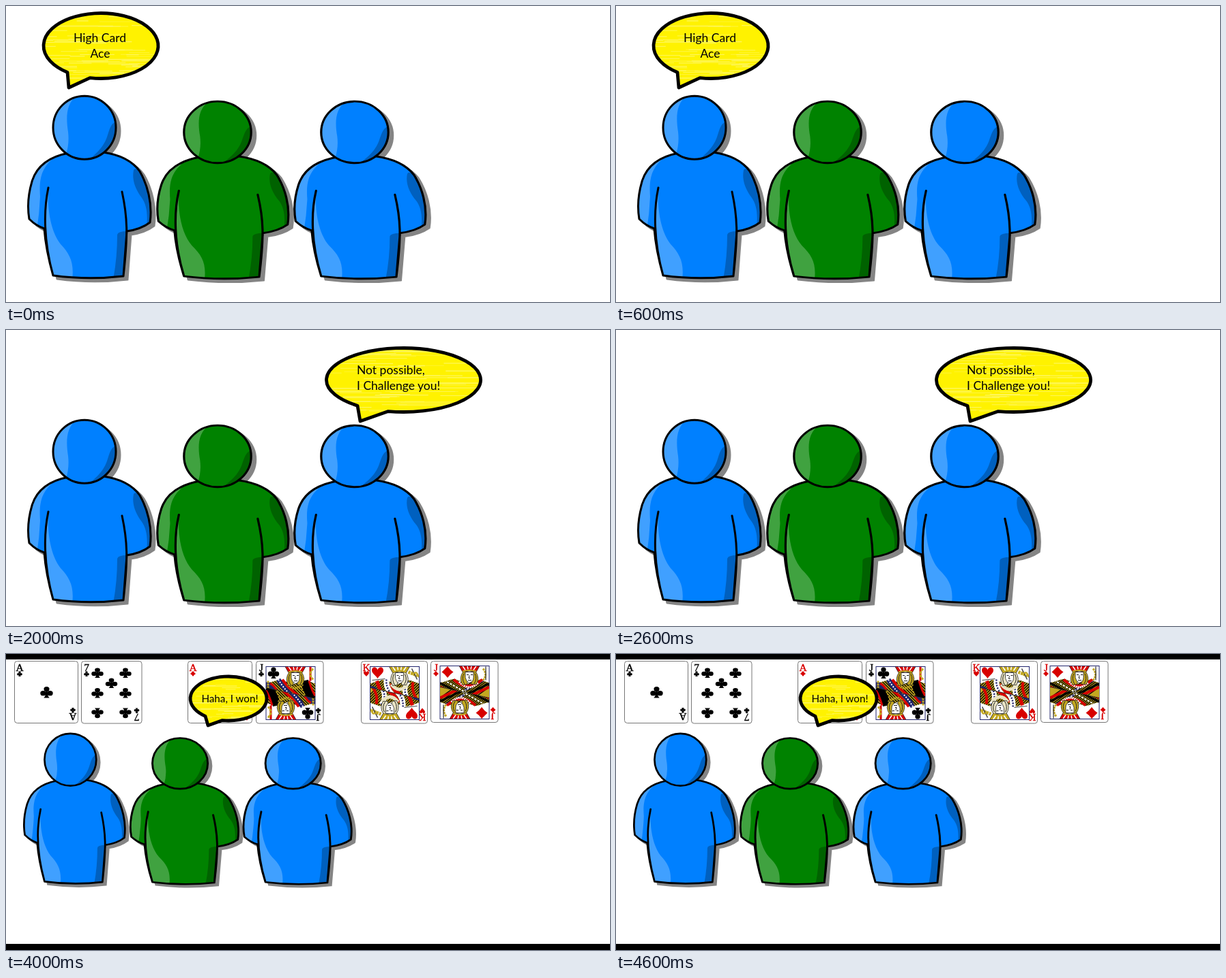
An HTML page that plays this animation: 885 by 435 pixels, repeating every 5 s.

```html
<!DOCTYPE html>
<html lang="en">
<head>
<meta charset="utf-8">
<title>Card bluff</title>
<style>
  html, body { margin: 0; width: 100%; height: 100%; overflow: hidden; background: #fff; }
  svg { display: block; width: 885px; height: 435px; }
  .say { font-family: Lato, "Open Sans", sans-serif; fill: #000; }
  .rank { font: 15.5px "Liberation Serif", "Noto Serif", serif; text-anchor: middle; stroke-width: .4px; }
</style>
</head>
<body>
<svg id="stage" viewBox="0 0 885 435"></svg>
<script>
const RED = '#d80000', NAVY = '#20246c', GOLD = '#c3a820', BLACK = '#000', WHITE = '#fff';
const STEP = 1000, STEPS = 5;

let seed = 7;
const rnd = () => (seed = (seed * 16807) % 2147483647) / 2147483647;
const shape = (d, attrs = '') => `<path d="${d}" ${attrs}/>`;
const group = (attrs, inner) => `<g ${attrs}>${inner}</g>`;
const line = ([d, color, width, dash = 'none']) =>
  shape(d, `fill="none" stroke="${color}" stroke-width="${width}" stroke-dasharray="${dash}"`);

// People
const BODY = 'M92 216C60 222 44 238 38 258C33 275 31 295 34 313Q44 323 56 327C58 355 63 375 69 396' +
  'Q120 403 172 397L177 331Q198 328 211 318C215 290 207 262 196 243C184 226 163 218 143 215Z';
const SEAMS = 'M62 267C55 300 55 345 69 396M170 273C178 310 179 335 172 397';
const BODY_LIGHT = 'M76 218C52 236 48 252 50 280Q49 305 45 330L20 320V215Z' +
  'M62 267C60 300 66 332 80 350C94 365 100 377 97 403L69 400C60 370 56 340 57 310Z';
const BODY_DARK = 'M187 241C184 256 190 270 199 282C206 292 208 306 206 326L220 325V270L201 246Q190 236 187 241Z' +
  'M163 336Q164 331 178 331L172 402H157Q163 370 163 336Z';
const HEAD_LIGHT = 'M106 130C87 142 88 165 91 185Q93 202 88 218L60 215V130Z';
const HEAD_DARK = 'M165 168C149 172 152 190 143 203C137 213 130 218 120 228H165Z';
const head = (attrs = '') => `<ellipse cx="115" cy="178.700" rx="46" ry="46.500" ${attrs}/>`;

function person(color) {
  const shade = (d, tone) => shape(d, `fill="${tone}" opacity=".25" stroke="none"`);
  const ink = 'fill="none" stroke="#000"';
  return group('transform="translate(6 5)" fill="#858585" stroke="#858585"', shape(BODY) + head()) +
    group('clip-path="url(#body)"',
      shape(BODY, `fill="${color}"`) + shade(BODY_LIGHT, WHITE) + shade(BODY_DARK, BLACK)) +
    shape(BODY + SEAMS, ink + ' stroke-linecap="round" stroke-linejoin="round"') +
    group('clip-path="url(#head)"',
      head(`fill="${color}"`) + shade(HEAD_LIGHT, WHITE) + shade(HEAD_DARK, BLACK)) +
    head(ink);
}

const wide = x => `transform="matrix(1.070 0 0 .974 ${x - 115 * 1.07} 11.400)"`;
const crowd = person('#0080ff') + group(wide(310), person('#008200')) + group(wide(511), person('#0080ff'));

// Speech bubbles
function bubble({ cx, cy, rx, ry, tip, from, to, size, text, anchor = 'start' }) {
  const low = x => cy + ry * Math.sqrt(1 - ((x - cx) / rx) ** 2);
  const d = `M${from} ${low(from)}A${rx} ${ry} 0 1 1 ${to} ${low(to)}L${tip}Z`;
  let streaks = '';
  for (let i = 0; i < ry * 1.5; i++) {
    const y = cy + (rnd() * 2 - 1) * ry, x = cx + (rnd() * 2 - 1.4) * rx;
    streaks += line([`M${x} ${y}h${rx * (.2 + rnd() * .8)}`, '#fffbb0', .5 + rnd()]);
  }
  const id = 'b' + cx;
  return `<clipPath id="${id}">${shape(d)}</clipPath>` +
    shape(d, 'fill="#fff200"') +
    group(`clip-path="url(#${id})" opacity=".5"`, streaks) +
    shape(d, 'fill="none" stroke="#000" stroke-width="4.800" stroke-linejoin="round"') +
    text.map(([x, y, s]) =>
      `<text class="say" x="${x}" y="${y}" font-size="${size}" text-anchor="${anchor}">${s}</text>`).join('');
}

const bubbles = [
  { cx: 139, cy: 58.5, rx: 84, ry: 48, tip: '92 120', from: 90, to: 123, size: 17.5, anchor: 'middle',
    text: [[137.5, 53, 'High Card'], [138, 76, 'Ace']] },
  { cx: 355, cy: 73, rx: 86, ry: 42, tip: '307 126', from: 304, to: 338, size: 17.5,
    text: [[337, 68, 'Pair'], [337, 91, 'Ace']] },
  { cx: 582.5, cy: 73.5, rx: 113, ry: 47, tip: '519 134', from: 515, to: 560, size: 17.5,
    text: [[514, 65, 'Not possible,'], [514, 88, 'I Challenge you!']] },
  { cx: 326, cy: 65.5, rx: 56, ry: 32.5, tip: '296 105', from: 292, to: 317, size: 15.2, anchor: 'middle',
    text: [[328, 71, 'Haha, I won!']] }
].map(bubble);

// Cards
const dot = (x, y) => `M${x - 4.3} ${y}a4.3 4.3 0 1 1 8.6 0a4.3 4.3 0 1 1 -8.6 0`;
const SUITS = {
  club: [BLACK, dot(0, -5.2) + dot(-5.4, 2) + dot(5.4, 2) + 'M-1.500 -3H1.500Q1 7 4.500 10H-4.500Q-1 7 -1.500 -3Z'],
  diamond: [RED, 'M0 -10Q4 -4 10 0Q4 4 0 10Q-4 4 -10 0Z'],
  heart: [RED, 'M0 10C-4 4 -10 1 -10 -4C-10 -11 -2 -11 0 -5C2 -11 10 -11 10 -4C10 1 4 4 0 10Z']
};
const pip = (suit, x, y, w, h = w, turn = 0) =>
  shape(SUITS[suit][1],
    `fill="${SUITS[suit][0]}" transform="translate(${x} ${y}) rotate(${turn}) scale(${w / 20} ${h / 20})"`);
const twice = (inner, x = 0, y = 0) => inner + group(`transform="rotate(180 ${x} ${y})"`, inner);

function card(x, y, w, h, rank, suit, inner) {
  const ink = SUITS[suit][0];
  const index = `<text class="rank" x="${x + 7.5}" y="${y + 14.5}" fill="${ink}" stroke="${ink}">${rank}</text>` +
    pip(suit, x + 7.5, y + 18.5, 8);
  return `<rect x="${x}" y="${y}" width="${w}" height="${h}" rx="4" fill="#fff" stroke="#777"/>` +
    twice(index, x + w / 2, y + h / 2) + inner;
}

function face(x, hat, hair) {
  return group(`transform="translate(${x} -25)"`,
    shape('M-9 -6Q-16 4 -10 14L-3 13V-6ZM9 -6Q16 4 10 13L3 13V-6Z', `fill="${hair}" stroke="#222" stroke-width=".8"`) +
    line(['M-8 -3Q-12 5 -7 13M8 -3Q12 5 7 12', '#222', 1]) +
    shape('M-6 -5V3Q-5 9 0 11Q6 9 6 3V-5Z', 'fill="#fff" stroke="#222" stroke-width=".8"') +
    line(['M-4 -1h3M2 -1h3M0 0L-1 4H1M-2 7H3', '#222', 1]) +
    shape('M-15 -14H15L10 -5Q0 -8 -10 -5Z', `fill="${hat}" stroke="#222" stroke-width=".8"`) +
    line(['M-10 -6Q0 -9 10 -6', GOLD, 2.2]) +
    line(['M-10 -14L-6 -8M-3 -14L-2 -9M3 -14L2 -9M10 -14L6 -8', WHITE, 1.5]));
}

// Fine diagonal engraving across a robe
function hatch(slope) {
  let d = '';
  for (let x = -60; x < 60; x += 4) d += `M${x} -22l${slope * 32} 32`;
  return line([d, BLACK, 1.3]);
}

function court(x, y, suit, slope, bands, hat, hair) {
  const half = group('clip-path="url(#half)"',
    group('clip-path="url(#robe)"',
      `<rect x="-36" y="-30" width="72" height="40" fill="${GOLD}"/>` + hatch(slope)) +
    bands.map(line).join('') + face(7, hat, hair) + pip(suit, -25, -30, 17));
  return group(`transform="translate(${x} ${y})"`,
    `<rect x="-36" y="-39" width="72" height="78" fill="#fff" stroke="${NAVY}"/>` +
    twice(half) + line(['M-36 -8L36 8', '#222', .8]));
}

const jackOfClubs = court(417, 57.5, 'club', 1, [
  ['M-36 -12Q-24 -14 -20 9', NAVY, 8],
  ['M-30 -14Q-20 -10 -17 9', RED, 3],
  ['M-18 -20Q-10 -6 4 6', NAVY, 7],
  ['M-18 -20Q-10 -6 4 6', WHITE, 2, '2 2'],
  ['M-12 -20Q-4 -8 12 4', RED, 4],
  ['M20 -18Q24 -4 32 9', BLACK, 12],
  ['M14 -14Q18 -2 24 9', GOLD, 2, '2 2'],
  ['M27 -18Q31 -4 36 4', RED, 3],
  ['M-4 -14Q7 0 18 -14', GOLD, 4, '2 1'],
  ['M29 -39V-18', RED, 3],
  ['M33 -36Q25 -28 33 -20', GOLD, 3, '4 1'],
  ['M-33 -18V6', GOLD, 3, '3 1']
], RED, GOLD);

const kingOfHearts = court(569.5, 57.5, 'heart', -1, [
  ['M-36 -8Q-26 -10 -20 8', NAVY, 4],
  ['M-26 -18Q-22 -4 -14 9', RED, 5],
  ['M-12 -20Q-14 -4 4 9', WHITE, 8],
  ['M-12 -20Q-14 -4 4 9', NAVY, 2.5, '2 2'],
  ['M-5 -14Q0 -2 14 8', RED, 6],
  ['M20 -17Q10 -6 20 10', WHITE, 7],
  ['M20 -17Q10 -6 20 10', NAVY, 2.5, '2 2'],
  ['M27 -16Q24 -4 32 8', RED, 4],
  ['M-5 -13Q7 2 19 -13', '#e9e3c2', 5],
  ['M20 -31L36 -25', GOLD, 5, '3 1'],
  ['M25 -36L33 -20', '#444', 1.5],
  ['M26 -27Q32 -35 35 -24', GOLD, 2],
  ['M-33 -19L-14 -21', '#444', 1.2]
], GOLD, '#e9e3c2');

const jackOfDiamonds = court(672, 56.5, 'diamond', -1.4, [
  ['M-36 -14L4 7', BLACK, 3],
  ['M-36 -8L0 10', RED, 4],
  ['M-30 -18L10 5', WHITE, 2, '3 2'],
  ['M36 -13L-4 6', BLACK, 3],
  ['M36 -8L0 9', RED, 4],
  ['M28 -18L0 -3', NAVY, 3],
  ['M28 -18L0 -3', WHITE, 1.5, '3 2'],
  ['M-16 -19Q4 0 26 -19', RED, 4],
  ['M-8 -16Q6 0 20 -15', WHITE, 3, '2 1'],
  ['M27 -35Q34 -26 27 -18', GOLD, 3, '3 1'],
  ['M31 -38V-18', '#333', 1.3]
], RED, GOLD);

const sevenSpots = [134, 175].map(x =>
  pip('club', x, 27.5, 18, 15) + pip('club', x, 57, 18, 15) + pip('club', x, 87, 18, 15, 180)).join('') +
  pip('club', 154.5, 42.5, 18, 15);

const cards =
  card(12.5, 10.5, 93, 91, 'A', 'club', pip('club', 59.5, 56, 19, 17)) +
  card(110.5, 10.5, 88.5, 91.5, '7', 'club', sevenSpots) +
  card(266.5, 10.5, 94, 91, 'A', 'diamond', pip('diamond', 313.5, 56.5, 15)) +
  card(366.5, 10.5, 98.5, 91.5, 'J', 'club', jackOfClubs) +
  card(520.5, 10.5, 97, 91.5, 'K', 'heart', kingOfHearts) +
  card(622.5, 10.5, 98.5, 90, 'J', 'diamond', jackOfDiamonds);

// Scenes: each layer lists the steps in which it shows
const layers = [
  [[0, 1, 2], group('stroke-width="3"', crowd)],
  [[3, 4], '<path d="M0 0H885V8H0ZM0 426H885V435H0Z"/>' + cards +
    group('transform="matrix(.824 0 0 .824 -.4 8)" stroke-width="3.300"', crowd)],
  [[0], bubbles[0]], [[1], bubbles[1]], [[2], bubbles[2]], [[4], bubbles[3]]
];

const stage = document.getElementById('stage');
stage.innerHTML = `<defs><clipPath id="body">${shape(BODY)}</clipPath><clipPath id="head">${head()}</clipPath>
  <clipPath id="half"><path d="M-36 -39H36V8L-36 -8Z"/></clipPath>
  <clipPath id="robe"><path d="M-36 -14L-16 -20L4 -13L22 -19L36 -14V10H-36Z"/></clipPath></defs>` +
  layers.map(([, art]) => group('class="layer"', art)).join('');
const nodes = [...stage.querySelectorAll('.layer')];

function draw() {
  const step = Math.floor(performance.now() / STEP) % STEPS;
  nodes.forEach((node, i) => {
    node.style.display = layers[i][0].includes(step) ? '' : 'none';
  });
  requestAnimationFrame(draw);
}
draw();
</script>
</body>
</html>
```
